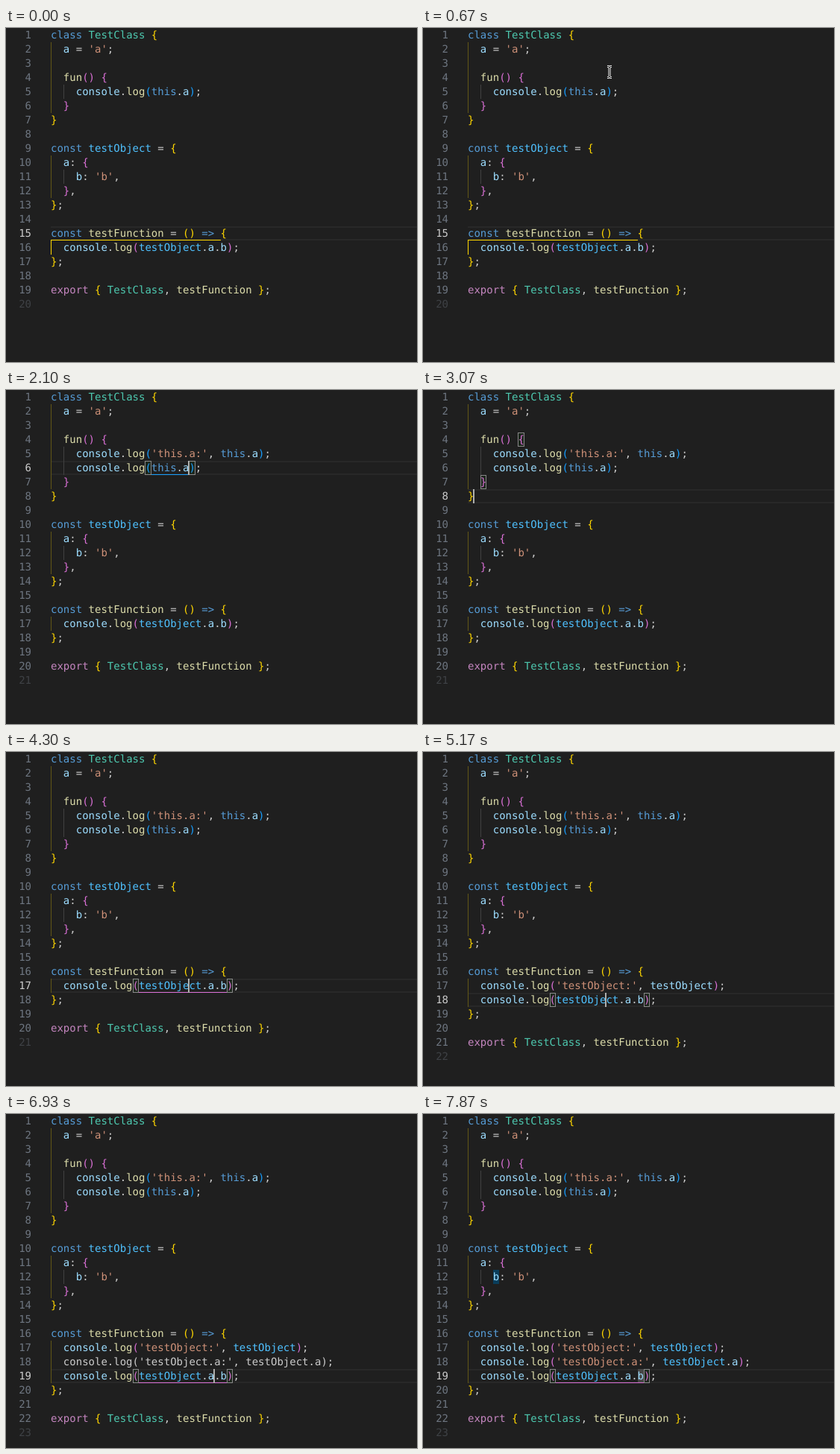
Write an HTML page that moves like this. It is 551x448 px and loops after 8 s.

```html
<!DOCTYPE html>
<html lang="en">
<head>
<meta charset="utf-8">
<title>Log insertion in a code editor</title>
<style>
  html, body { margin: 0; width: 100%; height: 100%; overflow: hidden; background: #1f1f1f; }
  #stage { position: relative; width: 551px; height: 448px; overflow: hidden; background: #1f1f1f;
    font: 14px/21px "DejaVu Sans Mono", monospace; color: #ccc;
    text-rendering: geometricPrecision; font-variant-ligatures: none; }
  #stage div { position: absolute; box-sizing: border-box; white-space: pre; }
  #pointer { position: absolute; left: 0; top: 0; overflow: visible; }
  .number { left: 0; width: 34px; text-align: right; color: #6e7681; }
  .number.active { color: #ccc; }
  .number.last { color: #3f4246; }
  .current { border: 2px solid #282828; border-width: 2px 0; }
  .match { border: 1px solid #888; background: rgba(0, 100, 0, .1); }
  .write { background: #093d5b; }
  .read { background: #474747; }
  .caret { background: #aeafad; }
</style>
</head>
<body>
<div id="stage">
  <div id="editor"></div>
  <svg id="pointer" width="1" height="1" fill="none">
    <g id="beam">
      <path d="M-3-7.5Q0-7.5 0-6V6Q0 7.5-3 7.5M3-7.5Q0-7.5 0-6M0 6Q0 7.5 3 7.5" stroke="#fff" stroke-width="3"/>
      <path d="M-3-7.5Q0-7.5 0-6V6Q0 7.5-3 7.5M3-7.5Q0-7.5 0-6M0 6Q0 7.5 3 7.5" stroke="#000"/>
    </g>
  </svg>
</div>
<script>
const LOOP = 8000, ROW = 19, LEFT = 60, CHAR = 8.428;
const editor = document.getElementById('editor');
const pointer = document.getElementById('pointer');
const beam = document.getElementById('beam');

const code = `class TestClass {
  a = 'a';

  fun() {
    console.log(this.a);
  }
}

const testObject = {
  a: {
    b: 'b',
  },
};

const testFunction = () => {
  console.log(testObject.a.b);
};

export { TestClass, testFunction };
`.split('\n');

// Lines the log shortcut adds, with the row each lands on
const inserts = [
  [5, "    console.log('this.a:', this.a);"],
  [17, "  console.log('testObject:', testObject);"],
  [18, "  console.log('testObject.a:', testObject.a);"]
];

const depthColors = ['#ffd700', '#da70d6', '#179fff'];
const guideColors = ['#625616', '#404040', '#404040'];
const rules = [
  [/^'/, '#ce9178'],
  [/^(class|const|this|=>)$/, '#569cd6'],
  [/^export$/, '#c586c0'],
  [/^TestClass$/, '#4ec9b0'],
  [/^testObject$/, '#4fc1ff'],
  [/^(testFunction|fun|log)$/, '#dcdcaa'],
  [/^\w/, '#9cdcfe']
];

// Each step changes part of the editor state at its time
const steps = [
  [0, { logs: 0, line: 15, col: 28, caret: false, boxes: [], marks: [], raw: 0, basic: 0, guide: true }],
  [1200, { line: 5, col: 22, caret: true }],
  [1270, { boxes: [[5, 15], [5, 22]] }],
  [1700, { caret: false }],
  [2100, { logs: 1, line: 6, caret: true, boxes: [[6, 15], [6, 22]] }],
  [2570, { line: 7, col: 3 }],
  [2630, { boxes: [[4, 8], [7, 2]] }],
  [3070, { line: 8, col: 1 }],
  [3100, { line: 9, col: 0 }],
  [3170, { line: 10, col: 20, boxes: [] }],
  [3230, { line: 11, col: 6 }],
  [3300, { line: 12, col: 11 }],
  [3370, { line: 13, col: 4 }],
  [3430, { line: 14, col: 2 }],
  [3500, { line: 15, col: 0 }],
  [3800, { line: 16, col: 22 }],
  [3870, { boxes: [[16, 21], [16, 22]] }],
  [4230, { line: 17 }],
  [4300, { boxes: [[17, 13], [17, 28]] }],
  [4470, { marks: [['write', 10, 6, 10], ['read', 17, 14, 10]] }],
  [4730, { caret: false }],
  [5170, { logs: 2, line: 18, caret: true, boxes: [[18, 13], [18, 28]], marks: [], basic: 17, guide: false }],
  [5270, { basic: 0 }],
  [5630, { col: 23 }],
  [5700, { col: 24 }],
  [5970, { marks: [['write', 10, 6, 10], ['read', 17, 29, 10], ['read', 18, 14, 10]] }],
  [6200, { col: 25, marks: [], guide: true }],
  [6230, { col: 26 }],
  [6470, { marks: [['write', 11, 2, 1], ['read', 18, 25, 1]] }],
  [6730, { caret: false }],
  [6930, { logs: 3, line: 19, caret: true, boxes: [[19, 13], [19, 28]], marks: [], raw: 18 }],
  [6970, { raw: 0, basic: 18 }],
  [7030, { basic: 0 }],
  [7400, { col: 28 }],
  [7630, { marks: [['write', 12, 4, 1], ['read', 19, 27, 1]] }],
  [7870, { caret: false }]
];

// Pointer path: time, x, y
const path = [
  [330, 342, 0], [600, 268, 48], [800, 218, 78], [1070, 249, 84],
  [1270, 249, 84], [1370, 384, 50], [1470, 346, 28], [2100, 346, 28]
];

const states = [];
steps.reduce((state, [, change]) => {
  const next = { ...state, ...change };
  states.push(next);
  return next;
}, {});

const xOf = col => Math.round(LEFT + col * CHAR);

function box(kind, x, y, w, h, color) {
  const fill = color ? `;background:${color}` : '';
  return `<div class="${kind}" style="left:${x}px;top:${y}px;width:${w}px;height:${h}px${fill}"></div>`;
}

function cells(kind, line, col, count) {
  return box(kind, xOf(col), (line - 1) * ROW, xOf(col + count) - xOf(col), ROW);
}

// Colours the text and collects bracket pairs
function parse(lines, state) {
  const pairs = [], open = [];
  let text = '';
  lines.forEach((source, i) => {
    const line = i + 1;
    for (const { 0: token, index: col } of source.matchAll(/'[^']*'|\w+|=>|\S/g)) {
      let color = '#ccc';
      if ('({['.includes(token)) {
        color = depthColors[open.length];
        open.push({ line, col, depth: open.length, indent: source.search(/\S/) });
      } else if (')}]'.includes(token)) {
        const start = open.pop();
        color = depthColors[start.depth];
        pairs.push({ ...start, endLine: line, endCol: col });
      } else {
        const rule = rules.find(([pattern]) => pattern.test(token));
        if (rule) color = rule[1];
      }
      if (line === state.raw) color = '#ccc';
      if (line === state.basic && token === 'testObject') color = '#9cdcfe';
      const shown = token.replace('>', '&gt;');
      text += `<div style="left:${LEFT + col * CHAR}px;top:${i * ROW}px;color:${color}">${shown}</div>`;
    }
  });
  return { text, pairs };
}

function guides(pairs, { line, col, guide }) {
  const holds = p => (line > p.line || line === p.line && col > p.col) &&
    (line < p.endLine || line === p.endLine && col <= p.endCol);
  const active = pairs.filter(holds).sort((a, b) => b.depth - a.depth)[0];
  return pairs.map(p => {
    const lit = p === active && guide;
    const color = (lit ? depthColors : guideColors)[p.depth];
    const single = p.line === p.endLine;
    const from = xOf(single ? p.col + 1 : p.indent);
    const to = xOf(single ? p.endCol : p.col);
    let html = '';
    if (!single) html += box('', from, p.line * ROW, 1, (p.endLine - p.line - 1) * ROW, color);
    if (lit && to > from) html += box('', from, p.line * ROW - 1, to - from, 1, color);
    return html;
  }).join('');
}

function draw(state) {
  const lines = [...code];
  inserts.slice(0, state.logs).forEach(([row, text]) => lines.splice(row - 1, 0, text));
  const { text, pairs } = parse(lines, state);
  const top = (state.line - 1) * ROW;
  const numbers = lines.map((_, i) => {
    const kind = i + 1 === state.line ? 'active' : i + 1 === lines.length ? 'last' : '';
    return `<div class="number ${kind}" style="top:${i * ROW}px">${i + 1}</div>`;
  }).join('');
  editor.innerHTML = box('current', LEFT, top, 551 - LEFT, ROW) +
    state.marks.map(mark => cells(...mark)).join('') +
    guides(pairs, state) +
    state.boxes.map(([line, col]) => cells('match', line, col, 1)).join('') +
    numbers + text +
    (state.caret ? box('caret', xOf(state.col) - 1, top, 2, ROW) : '');
}

function movePointer(t) {
  const next = path.findIndex(point => point[0] > t);
  pointer.style.display = next > 0 ? 'block' : 'none';
  if (next < 1) return;
  const [t0, x0, y0] = path[next - 1], [t1, x1, y1] = path[next];
  const k = (t - t0) / (t1 - t0);
  beam.setAttribute('transform', `translate(${Math.round(x0 + (x1 - x0) * k)} ${Math.round(y0 + (y1 - y0) * k)})`);
}

const start = performance.now();
let shown = -1;

function frame() {
  const t = (performance.now() - start) % LOOP;
  const index = steps.filter(([time]) => time <= t).length - 1;
  if (index !== shown) draw(states[shown = index]);
  movePointer(t);
  requestAnimationFrame(frame);
}
frame();
</script>
</body>
</html>
```
